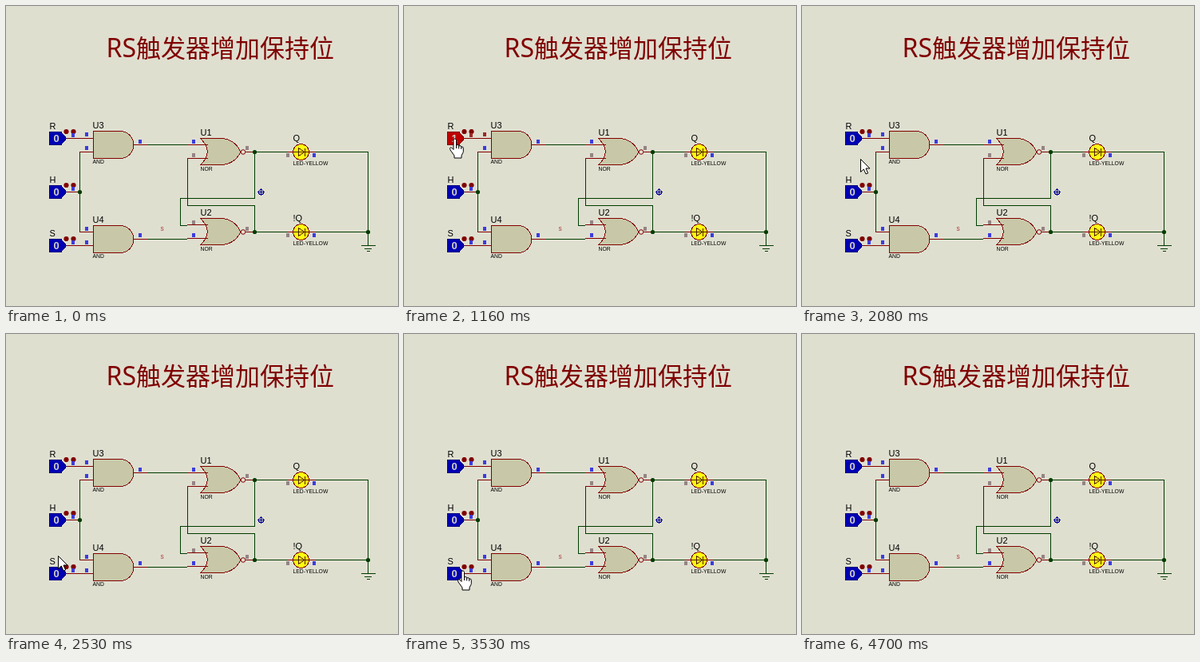
Recreate the animation shown at these times as an HTML page. Size 491x375 px, loop 5030 ms.

```html
<!DOCTYPE html>
<html lang="zh">
<head>
<meta charset="utf-8">
<title>RS触发器</title>
<style>
html, body { margin: 0; width: 100%; height: 100%; overflow: hidden; background: #dfdfd0; }
svg { display: block; width: 491px; height: 375px; }
text { font: 11px "Liberation Sans", Arial, sans-serif; fill: #000; }
.small { font-size: 6.8px; }
.net { font-size: 8.5px; fill: #b04040; }
.digit { font-weight: bold; font-size: 13px; fill: #d0d0c0; text-anchor: middle; }
.title { font: 300 31px "Noto Sans CJK SC", "Noto Sans CJK", sans-serif; fill: #800000; }
.latin { font: 300 32px "Noto Sans", "Open Sans", sans-serif; }
.wire, .lead { fill: none; stroke: #003c00; }
.lead { stroke: #840000; }
.wire, .lead, .body, .pin, .crisp { shape-rendering: crispEdges; }
.body { fill: #c8c8a8; stroke: #840000; }
.node { fill: #003c00; }
.dot { fill: #800000; }
</style>
</head>
<body>
<svg id="stage" viewBox="0 0 491 375" xmlns="http://www.w3.org/2000/svg"></svg>
<script>
const LOOP = 5030, BLUE = "#3c3ce0", GREY = "#948484", RED = "#a02828";
const stage = document.getElementById("stage");

function add(tag, attrs, text) {
  const el = document.createElementNS("http://www.w3.org/2000/svg", tag);
  for (const k in attrs) el.setAttribute(k, attrs[k]);
  if (text) el.textContent = text;
  return stage.appendChild(el);
}
const path = (cls, d) => add("path", { class: cls, d });
const label = (x, y, text, cls = "") => add("text", { x, y, class: cls }, text);
const circle = (cx, cy, r, attrs) => add("circle", { cx, cy, r, ...attrs });
const pin = (x, y, fill) => add("rect", { class: "pin", x: x - 2, y: y - 2, width: 4, height: 5, fill });

label(125.5, 64, "RS", "title latin");
label(163, 63.5, "触发器增加保持位", "title");

path("wire", `M92.5 182V283
  M177 173.5H227M177 291.5H227
  M311.5 182.5V240.5H218.5V274.5H227M311.5 282.5V249.5H227.5V190.5
  M311 182.5H352M311 282.5H352M388 182.5H453.5V291M388 282.5H453.5
  M453.5 291V299M445 299.5H463M449 303.5H458M452 306.5H456`);
path("lead", `M75 165.5H109M75 232.5H92M75 299.5H109
  M92 182.5H109M92 282.5H109
  M160 173.5H177M160 291.5H177
  M300 182.5H311M300 282.5H311
  M352 182.5H360M352 282.5H360M379 182.5H388M379 282.5H388`);

function andGate(y, name) {
  path("body", `M109.5 ${y}H143A17 17 0 0 1 143 ${y + 34}H109.5Z`);
  label(108.5, y - 3.2, name);
  label(108.5, y + 40.8, "AND", "small");
}
function norGate(y, name) {
  path("body", `M243.5 ${y}H268Q286 ${y} 294 ${y + 17}Q286 ${y + 33} 268 ${y + 33}H243.5Q261 ${y + 17} 243.5 ${y}Z`);
  circle(297, y + 17, 2.8, { fill: "#dfdfd0", stroke: "#840000" });
  path("lead", `M227 ${y + 8}H253M227 ${y + 25}H253`);
  label(243.5, y - 3.5, name);
  label(243.5, y + 40.5, "NOR", "small");
}
function led(y, name) {
  circle(369.5, y, 10, { class: "crisp", fill: "#ffff10", stroke: "#840000" });
  add("path", {
    class: "crisp",
    d: `M360 ${y}H379M366.5 ${y - 5}V${y + 5}L374 ${y}ZM374.5 ${y - 5}V${y + 5}`,
    fill: "none", stroke: "#501800"
  });
  label(359.5, y - 13.5, name);
  label(359.5, y + 16.5, "LED-YELLOW", "small");
}
function toggle(y, name) {
  const box = add("path", { class: "crisp", d: `M54.5 ${y - 8}H69L75.5 ${y}L69 ${y + 8}H54.5Z` });
  const digit = label(63, y + 4.4, "0", "digit");
  label(54.5, y - 11.5, name);
  for (const x of [75.5, 84.5]) circle(x, y - 8.5, 3.1, { class: "dot" });
  return { box, digit, pins: [pin(84, y - 5, BLUE)] };
}

andGate(156.5, "U3");
andGate(274.5, "U4");
norGate(165.5, "U1");
norGate(265.5, "U2");
led(182.5, "Q");
led(282.5, "!Q");
const R = toggle(165.5, "R"), H = toggle(232.5, "H"), S = toggle(299.5, "S");
R.pins.push(pin(101, 160, BLUE));
S.pins.push(pin(101, 295, BLUE));

[[101, 177], [101, 278], [168, 169], [235, 169], [168, 286], [235, 286], [386, 186], [386, 286]]
  .forEach(([x, y]) => pin(x, y, BLUE));
[[235, 186], [302, 177], [235, 270], [302, 278], [353, 186], [353, 286]]
  .forEach(([x, y]) => pin(x, y, GREY));
[[92.5, 232.5], [311.5, 182.5], [311.5, 282.5], [453.5, 282.5]]
  .forEach(([x, y]) => circle(x, y, 2.6, { class: "node" }));

label(193.5, 281, "s", "net");
circle(319.5, 232.5, 3, { class: "crisp", fill: "none", stroke: "#0000a0" });
add("path", { class: "crisp", d: "M315 232.5H324M319.5 228V237", stroke: "#000080" });

const ink = { fill: "#fff", stroke: "#000", "stroke-linejoin": "round" };
const arrow = add("path", { ...ink, d: "M.5 .5V16.5L4.3 13L7 19L9.6 18L7 12H12Z" });
const hand = add("path", {
  ...ink,
  d: `M-2 1.5Q-2 0-.3 0T1.5 1.5V8Q4.5 6.5 4.7 9Q7.5 7.8 7.7 10Q10.3 9.3 10.3 12V16.5L8 21V24H-1V21
    L-6 14Q-7.5 10.5-4.5 11L-2 13.5ZM1.5 8V12M4.7 9V12.5M7.7 10V13`
});

const settle = p => 1 - (1 - p ** 1.5) ** 6;
const smooth = p => p * p * (3 - 2 * p);
const leave = p => p ** 1.6;

// start, end, steps, x, y, easing
const moves = [
  [90, 600, 13, 66, 165, settle],
  [860, 1160, 8, 64, 166, smooth],
  [1620, 2120, 12, 73, 191, settle],
  [2160, 2620, 12, 63, 296, smooth],
  [3240, 3450, 5, 74, 296, smooth],
  [4120, 4610, 13, 412, 368, leave],
  [4650, 4651, 2, 425, 369, () => 1]
];
function cursorAt(t) {
  let x = 412, y = 367;
  for (const [t0, t1, n, tx, ty, ease] of moves) {
    if (t < t0) break;
    const p = Math.min(1, Math.floor((t - t0) / (t1 - t0) * (n - 1) + 1e-6) / (n - 1));
    const e = ease(p);
    x += (tx - x) * e;
    y += (ty - y) * e;
  }
  return [Math.round(x), Math.round(y)];
}
const overToggle = (x, y) => x >= 54 && x <= 75 && [165.5, 232.5, 299.5].some(c => Math.abs(y - c) < 9);

function setToggle(s, on) {
  s.box.setAttribute("fill", on ? "#c00000" : "#0000b4");
  s.box.setAttribute("stroke", on ? "#800000" : "#000080");
  s.digit.textContent = on ? "1" : "0";
  s.pins.forEach(p => p.setAttribute("fill", on ? RED : BLUE));
}
function draw(t) {
  const [x, y] = cursorAt(t), shown = t >= 90 && t < 4700, over = overToggle(x, y);
  for (const [el, on] of [[arrow, shown && !over], [hand, shown && over]]) {
    el.setAttribute("transform", `translate(${x} ${y})`);
    el.setAttribute("visibility", on ? "visible" : "hidden");
  }
  setToggle(R, t >= 900 && t < 1330);
  setToggle(H, false);
  setToggle(S, t >= 2740 && t < 2990);
}
const begin = performance.now();
function tick() {
  draw((performance.now() - begin) % LOOP);
  requestAnimationFrame(tick);
}
draw(0);
requestAnimationFrame(tick);
</script>
</body>
</html>
```
